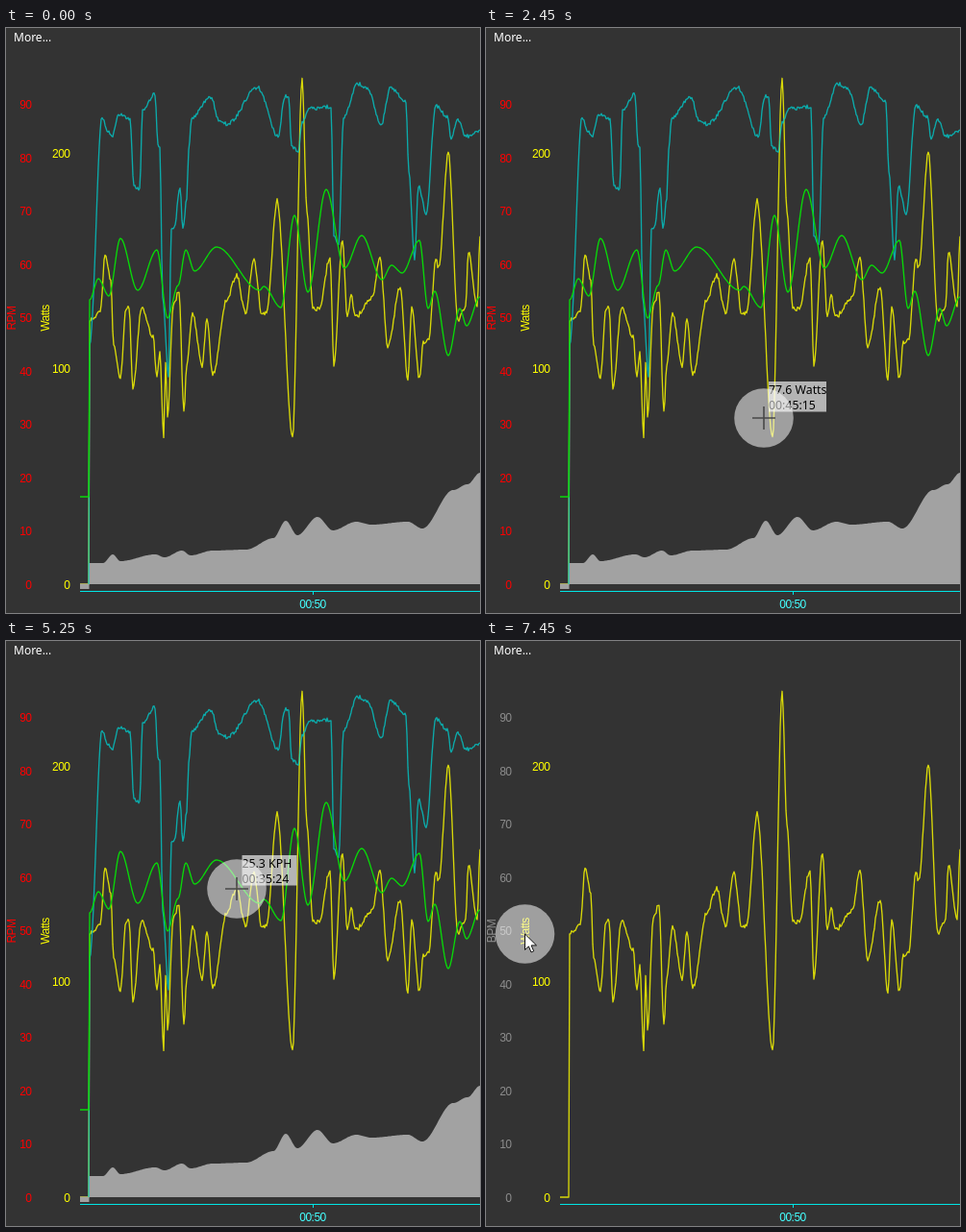
Animation, 493 px wide and 609 px high, one loop 8 s. Source, as an HTML page:

```html
<!DOCTYPE html>
<html lang="en">
<head>
<meta charset="utf-8">
<title>Ride chart</title>
<style>
  html, body { margin: 0; width: 100%; height: 100%; overflow: hidden; background: #333; }
  svg { display: block; width: 100vw; height: 100vh; }
  .axis text { font: 12px "Liberation Sans", Arial, sans-serif; letter-spacing: -.5px; }
  .tip text { font: 12.3px "Noto Sans", "Open Sans", sans-serif; }
  .menu { font: 12px "Noto Sans", "Open Sans", sans-serif; fill: #fff; }
  .line { fill: none; stroke-width: 1.35; stroke-linejoin: round; }
</style>
</head>
<body>
<svg viewBox="0 0 493 609">
  <rect width="493" height="609" fill="#333"/>
  <path id="power" class="line" stroke="#d8d808"/>
  <g id="others">
    <path id="hill" fill="#a2a2a2"/>
    <rect x="77" y="578.5" width="9.5" height="5.5" fill="#a2a2a2"/>
    <path id="heart" class="line" stroke="#00cccc" stroke-opacity=".78"/>
    <path id="speed" class="line" stroke="#08d808"/>
  </g>
  <path d="M77 586.5H493M319.5 586V590" stroke="#00e5e5" fill="none"/>
  <g class="axis">
    <g id="cadence" text-anchor="end"></g>
    <text id="unit" text-anchor="middle" transform="translate(10 302) rotate(-90)"></text>
    <g id="watts" text-anchor="end" fill="#ff0">
      <text text-anchor="middle" transform="translate(44.5 302) rotate(-90)">Watts</text>
    </g>
    <text x="319" y="604" text-anchor="middle" fill="#4ff">00:50</text>
  </g>
  <text class="menu" x="8" y="14">More...</text>
  <g id="tip" class="tip">
    <rect height="31.5" fill="#fff" fill-opacity=".63"/>
    <text y="13"></text>
    <text y="28.5"></text>
  </g>
  <g id="pointer">
    <circle r="30.8" fill="#fff" fill-opacity=".53"/>
    <path id="cross" d="M-12 0H12M0-12V12" stroke="#484848" stroke-width="1.6"/>
    <path id="arrow" d="M0 0V16.5L3.9 12.9L6.5 19L9.2 17.8L6.6 11.9H12Z" fill="#fff" stroke="#111"/>
  </g>
</svg>
<script>
const LOOP = 8000, STEP = 50, FOCUS_AT = 7400, PLOT_LEFT = 77, PLOT_RIGHT = 493, ZERO = 583.5;
const $ = id => document.getElementById(id);
const smooth = u => u * u * (3 - 2 * u);

// Eases through [time, ...values] rows.
function along(keys, at, ease = u => u) {
  const i = keys.findIndex(k => k[0] > at);
  if (i === 0) return keys[0].slice(1);
  if (i < 0) return keys[keys.length - 1].slice(1);
  const a = keys[i - 1], b = keys[i], u = ease((at - a[0]) / (b[0] - a[0]));
  return a.slice(1).map((v, j) => v + (b[j + 1] - v) * u);
}

function seeded(seed) {
  return () => (seed = seed * 16807 % 2147483647) / 2147483647;
}

// Draws a curve through its peaks and troughs, roughened by seeded jitter.
function trace(id, turns, jitter = 0) {
  const keys = turns.trim().split(/\s+/).map(s => s.split(',').map(Number));
  const random = seeded(71), start = keys[0][0], points = [];
  for (let x = start; x <= PLOT_RIGHT; x++) {
    const rough = x > 88 ? (random() - .5) * jitter : 0;
    points.push(`${x},${(along(keys, x, smooth)[0] + rough).toFixed(1)}`);
  }
  $(id).setAttribute('d', 'M' + points.join('L'));
}

trace('hill', `86,557 101,557 111,548 119,555 155,548 165,551 183,544 192,549 215,544
  250,543 278,531 291,513 303,528 324,509 340,523 364,514 380,517 418,514 433,521
  465,481 480,475 493,463`);
$('hill').setAttribute('d', $('hill').getAttribute('d') + 'V579H86Z');

trace('speed', `77,488 86,488 87,283 96,261 107,279 119,219 137,273 157,231 168,302
  179,268 187,231 196,253 219,228 264,273 268,269 286,291 300,195 314,275 333,168
  352,250 370,216 391,262 401,247 412,255 430,221 439,292 446,274 460,341 472,292
  479,310 493,280`);

trace('heart', `86,579 87,330 100,92 106,108 111,112 117,90 129,94 133,165 139,167
  142,85 155,69 158,122 160,125 163,280 169,362 172,208 175,208 181,165 184,210
  188,178 190,128 193,93 213,72 222,97 230,100 262,62 283,113 290,71 294,72 297,123
  304,128 308,98 315,84 338,82 341,215 346,226 351,93 366,58 376,63 390,101 400,62
  416,77 419,150 425,240 429,165 437,193 447,81 459,92 463,116 470,95 478,113 493,107`, 4);

trace('power', `77,579 86,579 87,305 98,296 103,235 109,262 112,332 119,364 125,291
  128,290 132,376 141,290 153,322 157,364 160,338 164,424 166,348 168,404 174,288
  180,274 185,400 188,352 194,296 204,352 209,303 215,361 230,282 240,257 249,297
  258,242 266,297 271,297 282,180 298,426 308,53 313,190 319,292 326,292 337,238
  341,350 350,220 355,302 359,277 363,301 381,281 389,239 397,332 410,270 418,366
  422,289 430,366 434,328 440,322 447,241 450,250 460,130 470,304 478,291 481,232
  490,290 493,218`, 5);

function label(parent, value, x, y) {
  const text = document.createElementNS('http://www.w3.org/2000/svg', 'text');
  text.textContent = value;
  text.setAttribute('x', x);
  text.setAttribute('y', y);
  $(parent).append(text);
}
for (let v = 0; v <= 90; v += 10) label('cadence', v, 26.5, ZERO - v * 5.545);
for (let v = 0; v <= 200; v += 100) label('watts', v, 66.5, ZERO - v * 2.243);

// time, x, y
const path = [
  [50, 390, 645], [850, 276, 490], [900, 276, 490], [1650, 258, 443], [1950, 246, 411],
  [2200, 245, 414], [2450, 289, 406], [2600, 302, 416], [3100, 305, 424], [3850, 302, 424],
  [3900, 293.5, 406], [4500, 245, 258], [4950, 240, 258], [6200, 240, 258],
  [6250, 235.5, 258], [7050, 98, 282], [7450, 40.5, 305]
];

const tips = [
  { from: 2350, to: 2500, dx: 5, dy: -38, width: 60, value: '77.6 Watts', clock: '00:45:15' },
  { from: 2500, to: 3950, dx: 7, dy: -30, width: 61, value: '74.6 Watts', clock: '00:45:18' },
  { from: 4400, to: 5350, dx: 5.5, dy: -35, width: 57, value: '25.3 KPH', clock: '00:35:24' }
];

const show = (el, on) => el.setAttribute('display', on ? 'inline' : 'none');
const move = (el, x, y) => el.setAttribute('transform', `translate(${x} ${y})`);

function drawTip(t, x, y) {
  const tip = tips.find(k => t >= k.from && t < k.to);
  show($('tip'), tip);
  if (!tip) return;
  const [box, top, bottom] = $('tip').children;
  move($('tip'), x + tip.dx, y + tip.dy);
  box.setAttribute('width', tip.width);
  top.textContent = tip.value;
  bottom.textContent = tip.clock;
}

function draw(time) {
  const t = Math.floor(time / STEP) * STEP;
  const [x, y] = along(path, t);
  move($('pointer'), x, y);
  show($('cross'), x >= PLOT_LEFT);
  show($('arrow'), x < PLOT_LEFT);
  drawTip(t, x, y);

  const focus = t >= FOCUS_AT, tint = focus ? '#8c8c8c' : '#f00';
  show($('others'), !focus);
  $('cadence').setAttribute('fill', tint);
  $('unit').setAttribute('fill', tint);
  $('unit').textContent = focus ? 'BPM' : 'RPM';
}

const start = performance.now();
function tick() {
  draw((performance.now() - start) % LOOP);
  requestAnimationFrame(tick);
}
tick();
</script>
</body>
</html>
```
